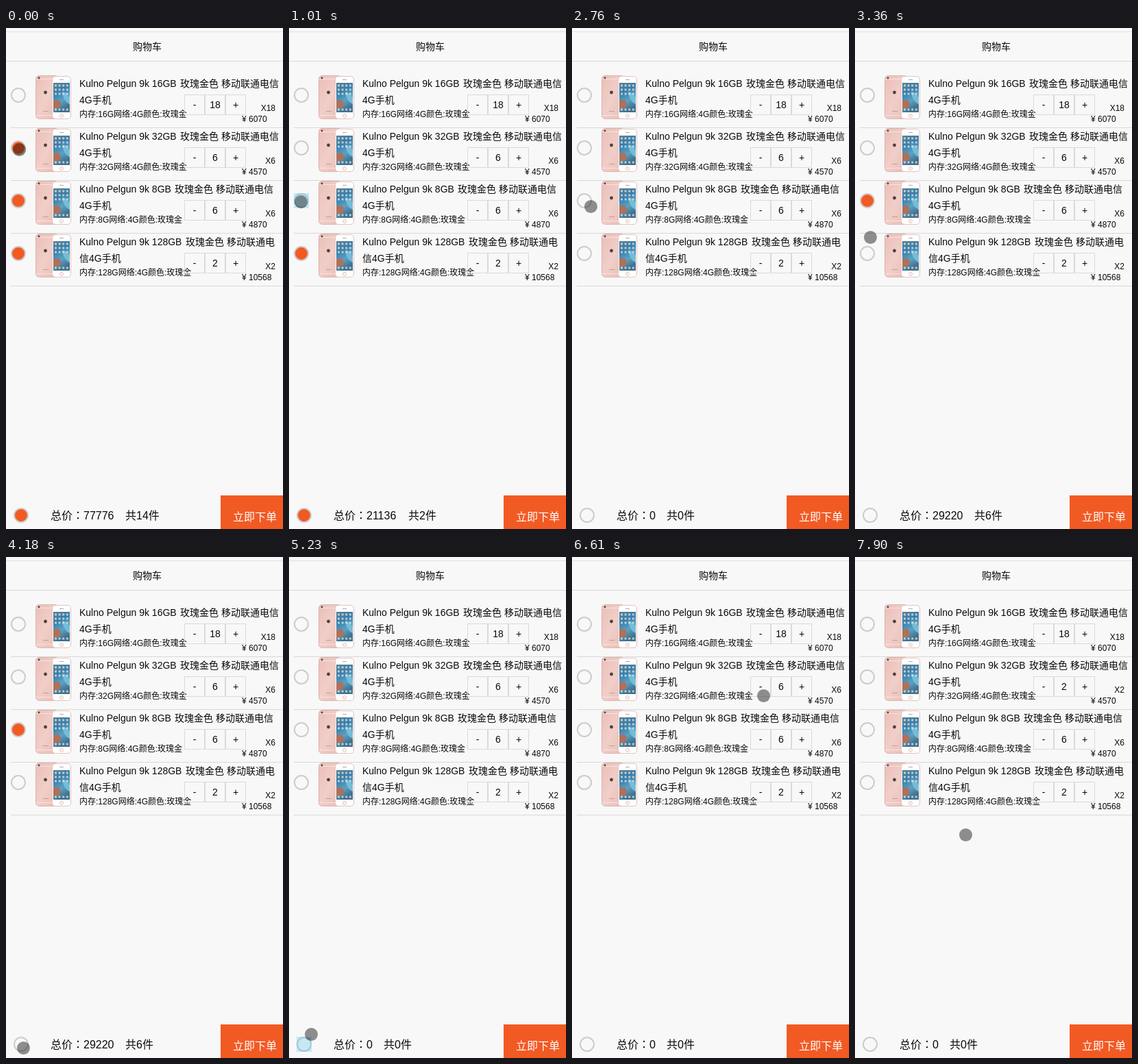
These frames come from a looping animation (404 by 731 pixels, 8000 ms). An HTML page:

```html
<!DOCTYPE html>
<html lang="zh-CN">
<head>
<meta charset="utf-8">
<title>购物车</title>
<style>
html, body { margin: 0; width: 100%; height: 100%; overflow: hidden; background: #f8f8f8; }
svg { display: block; width: 404px; height: 731px; font: 14px "Liberation Sans", "Noto Sans CJK SC", sans-serif; fill: #0a0a0a; }
.s { font-size: 12px; }
.l { font-size: 16px; }
.colon { font-family: "Noto Sans CJK TC", sans-serif; }
.line { fill: #d8d8d8; }
.box { fill: none; stroke: #dadada; }
.ring { stroke: #ccc; stroke-width: 2; }
.tap { fill: #33b5e5; fill-opacity: .25; }
</style>
</head>
<body>
<svg viewBox="0 0 404 731">
  <defs>
    <linearGradient id="back" x2="1" y2="1">
      <stop stop-color="#eabfb7"/><stop offset=".5" stop-color="#f1cec8"/><stop offset="1" stop-color="#e9bcb5"/>
    </linearGradient>
    <linearGradient id="screen" x2=".3" y2="1">
      <stop stop-color="#5b7f92"/><stop offset=".35" stop-color="#3a7ca9"/>
      <stop offset=".7" stop-color="#5aa3c6"/><stop offset="1" stop-color="#42708d"/>
    </linearGradient>
    <g id="phone">
      <rect x="43.5" y="69.5" width="33" height="63" rx="5" fill="url(#back)" stroke="#dfb3ac"/>
      <path d="M44 74.5H76M44 127.5H76" stroke="#f7e3df"/>
      <circle cx="48" cy="73" r="1.4" fill="#444"/>
      <circle cx="57.5" cy="94" r="2.4" fill="#4a4040"/>
      <path d="M54 121.5h8" stroke="#c99b94"/>
      <rect x="67.5" y="70.5" width="27" height="62" rx="4.5" fill="#fff" stroke="#e3c3bd"/>
      <path d="M78 75.5h6" stroke="#aaa"/>
      <rect x="69" y="80" width="24" height="43" fill="url(#screen)"/>
      <path d="M69 107q7-5 10 1t-3 9l-7 1z" fill="#b0705a"/>
      <path d="M82 93q8 2 11 9v9q-9-3-11-18z" fill="#76bcd6"/>
      <path d="M71 84h20M71 90h20M71 96h20M71 119h20" stroke="#dce8e6" stroke-width="3" stroke-dasharray="3 2.6" opacity=".75"/>
      <circle cx="81" cy="128" r="2.4" fill="#fff" stroke="#dfb9b2"/>
    </g>
  </defs>
  <rect class="line" y="5" width="404" height="1" opacity=".75"/>
  <text x="185" y="32">购物车</text>
  <rect class="line" y="48" width="404" height="1"/>
  <g id="rows"></g>
  <circle class="ring" cx="22" cy="711" r="10"/>
  <text class="l" x="65" y="717">总价<tspan class="colon" lang="zh-TW">：</tspan><tspan id="sum" x="113"></tspan><tspan id="count"></tspan></text>
  <rect x="313" y="682" width="91" height="49" fill="#f25a24"/>
  <text class="l" x="331" y="719" fill="#fff">立即下单</text>
  <rect id="tap" class="tap" width="22" height="22"/>
  <circle id="cursor" cx=".5" cy=".5" r="9.5" opacity=".45"/>
</svg>
<script>
const $ = id => document.getElementById(id);
const LOOP = 8000, ALL = 4;
const items = [
  { size: '16', price: 6070, qty: 18 },
  { size: '32', price: 4570, qty: 6 },
  { size: '8', price: 4870, qty: 6 },
  { size: '128', price: 10568, qty: 2 }
];

const button = (label, i) => `<rect class="box" x="${260.5 + 30 * i}" y="97.5" width="29" height="29"/>
  <text class="cell" x="${275 + 30 * i}" y="117" text-anchor="middle">${label}</text>`;

$('rows').innerHTML = items.map(({ size, price, qty }, i) => {
  const x = 238 + size.length * 8, long = size.length > 2;
  return `<g class="row" transform="translate(0 ${i * 77})">
    <circle class="ring" cx="18" cy="98" r="10"/>
    <use href="#phone"/>
    <text x="107" y="86">Kulno Pelgun 9k ${size}GB</text>
    <text x="${x}" y="86">玫瑰金色</text>
    <text x="${x + 60}" y="86">移动联通电${long ? '' : '信'}</text>
    <text x="107" y="110">${long ? '信' : ''}4G手机</text>
    <text class="s" x="107" y="130">内存:${size}G网络:4G颜色:玫瑰金</text>
    ${['-', qty, '+'].map(button).join('')}
    <text class="s times" x="393" y="121" text-anchor="end">X${qty}</text>
    <text class="s" x="344" y="137">¥ ${price}</text>
    <rect class="line" x="7" y="145" width="397" height="1"/>
  </g>`;
}).join('');

const rings = document.querySelectorAll('.ring');
const editedRow = document.querySelectorAll('.row')[1];

// time, tapped circle
const taps = [[290, 1], [990, 2], [1880, ALL], [3140, 2], [4340, ALL], [5230, ALL]];

// start, end, x, y, sideways bend
const moves = [
  [0, 1, 19, 177, 0], [290, 990, 17, 253, 0], [1130, 1600, 24, 716, 30],
  [2020, 2730, 27, 260, 65], [2880, 3000, 19, 253, 0], [3290, 3630, 25, 716, 20],
  [5180, 5230, 32, 696, 0], [5230, 6190, 11, 174, 230], [6190, 6590, 279, 202, 0],
  [7390, 7900, 161, 405, 0]
];

function pointer(t) {
  let x = 19, y = 177;
  for (const [start, end, toX, toY, bend] of moves) {
    const p = Math.min(1, Math.max(0, (t - start) / (end - start)));
    const k = p * p * (3 - 2 * p);
    x += (toX - x) * k + bend * Math.sin(Math.PI * k) ** 2;
    y += (toY - y) * k;
  }
  return [x, y];
}

function checkedAt(t) {
  const checked = [false, true, true, true, true];
  for (const [time, i] of taps) {
    if (time > t) break;
    checked[i] = !checked[i];
    if (i === ALL) checked.fill(checked[ALL]);
  }
  return checked;
}

function draw(t) {
  const checked = checkedAt(t);
  const chosen = items.filter((item, i) => checked[i]);
  const qty = items[1].qty = 6 - Math.min(4, Math.max(0, Math.floor((t - 6510) / 220)));
  const sum = chosen.reduce((s, item) => s + item.price * item.qty, 0);
  const count = chosen.reduce((s, item) => s + item.qty, 0);

  rings.forEach((ring, i) => ring.setAttribute('fill', checked[i] ? '#f25a24' : 'none'));
  editedRow.querySelectorAll('.cell')[1].textContent = qty;
  editedRow.querySelector('.times').textContent = 'X' + qty;
  $('sum').textContent = sum;
  $('count').textContent = `共${count}件`;
  $('count').setAttribute('x', 129 + 9 * String(sum).length);

  const tapped = taps.find(([time]) => t >= time && t < time + 140);
  $('tap').style.display = tapped ? '' : 'none';
  if (tapped) {
    const [x, y] = tapped[1] === ALL ? [11, 700] : [7, 87 + 77 * tapped[1]];
    $('tap').setAttribute('transform', `translate(${x} ${y})`);
  }
  $('cursor').setAttribute('transform', `translate(${pointer(t).map(Math.round)})`);
}

function frame() {
  draw(performance.now() % LOOP);
  requestAnimationFrame(frame);
}
frame();
</script>
</body>
</html>
```
